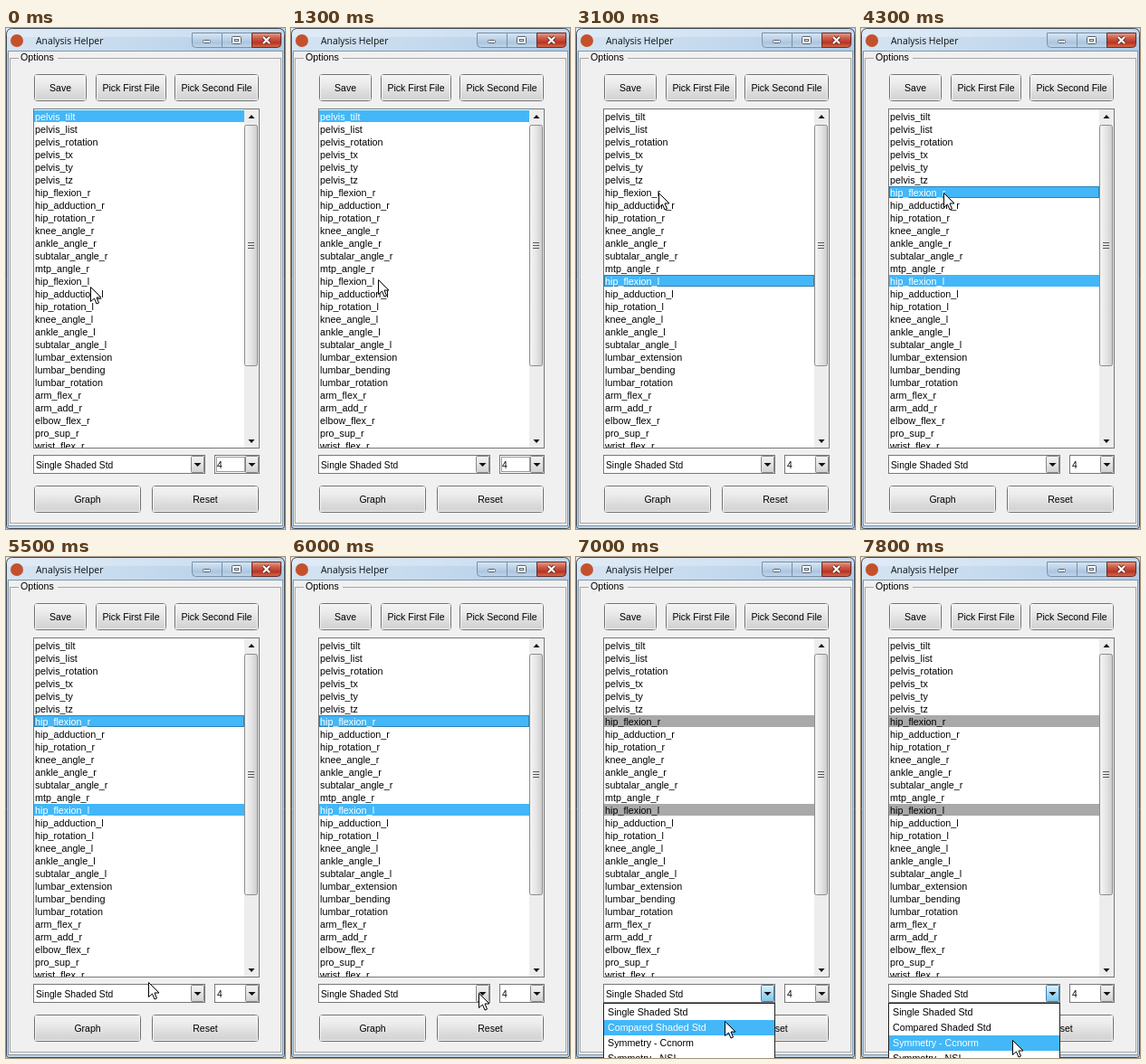
Animation, 308 px wide and 554 px high, one loop 8 s. Source, as an HTML page with a canvas:

```html
<!DOCTYPE html>
<html lang="en">
<head>
<meta charset="utf-8">
<title>Analysis Helper</title>
<style>
html, body { margin: 0; width: 100%; height: 100%; overflow: hidden; }
canvas { display: block; width: 308px; height: 554px; }
</style>
</head>
<body>
<canvas id="stage" width="308" height="554"></canvas>
<script>
const ctx = document.getElementById('stage').getContext('2d');
const LOOP = 8000, CLICK_LEFT = 1500, CLICK_RIGHT = 3700, OPEN = 6100;
const BLUE = '#43b7f8', GREY = '#a9a9a9', FACE = '#f0f0f0';

const sides = s => ['hip_flexion', 'hip_adduction', 'hip_rotation', 'knee_angle',
  'ankle_angle', 'subtalar_angle'].map(n => n + s);
const rows = [
  ...['tilt', 'list', 'rotation', 'tx', 'ty', 'tz'].map(n => 'pelvis_' + n),
  ...sides('_r'), 'mtp_angle_r', ...sides('_l'),
  ...['extension', 'bending', 'rotation'].map(n => 'lumbar_' + n),
  ...['arm_flex', 'arm_add', 'elbow_flex', 'pro_sup', 'wrist_flex'].map(n => n + '_r')
];
const plots = ['Single Shaded Std', 'Compared Shaded Std', 'Symmetry - Ccnorm', 'Symmetry - NSI'];

// Pointer path: time, x, y
const path = [
  [0, 93, 286], [100, 93, 286], [700, 95, 281], [1300, 96, 278], [1800, 96, 278],
  [2100, 98, 254], [2600, 92, 186], [3100, 91, 182], [4400, 91, 182], [5000, 136, 405],
  [5500, 157, 470], [5900, 207, 482], [6200, 207, 483], [6700, 163, 509],
  [6900, 163, 509], [7600, 167, 534], [8000, 167, 534]
];

function pointer(t) {
  const i = path.findIndex(p => p[0] > t);
  const [t0, x0, y0] = path[i - 1], [t1, x1, y1] = path[i];
  const k = (t - t0) / (t1 - t0);
  return [Math.round(x0 + (x1 - x0) * k), Math.round(y0 + (y1 - y0) * k)];
}

function fill(x, y, w, h, color) {
  ctx.fillStyle = color;
  ctx.fillRect(x, y, w, h);
}

function frame(x, y, w, h, color, dash = []) {
  ctx.strokeStyle = color;
  ctx.lineWidth = 1;
  ctx.setLineDash(dash);
  ctx.strokeRect(x + .5, y + .5, w - 1, h - 1);
  ctx.setLineDash([]);
}

function box(x, y, w, h, color, radius, edge) {
  ctx.beginPath();
  ctx.roundRect(x + .5, y + .5, w - 1, h - 1, radius);
  ctx.fillStyle = color;
  ctx.fill();
  ctx.strokeStyle = edge;
  ctx.lineWidth = 1;
  ctx.stroke();
}

function shade(x0, y0, x1, y1, ...colors) {
  const g = ctx.createLinearGradient(x0, y0, x1, y1);
  colors.forEach((c, i) => g.addColorStop(i / (colors.length - 1), c));
  return g;
}

// y is the vertical middle of the capitals
function text(s, x, y, size = 10.8, color = '#000', align = 'left', face = '"Liberation Sans", Arial') {
  ctx.font = `${size}px ${face}, sans-serif`;
  ctx.textAlign = align;
  ctx.fillStyle = color;
  ctx.fillText(s, x, y + 4);
}

function poly(points, color, edge) {
  ctx.beginPath();
  points.forEach(([x, y]) => ctx.lineTo(x, y));
  ctx.closePath();
  ctx.fillStyle = color;
  ctx.fill();
  if (edge) {
    ctx.strokeStyle = edge;
    ctx.lineWidth = 1;
    ctx.stroke();
  }
}

const arrow = (x, y, w, h) => poly([[x - w, y - h / 2], [x + w, y - h / 2], [x, y + h / 2]], '#111');

function button(label, x, y, w) {
  box(x, y, w, 30, shade(0, y, 0, y + 30, '#f4f4f4', '#ececec', '#dcdcdc', '#d0d0d0'), 3, '#707070');
  frame(x + 1, y + 1, w - 2, 28, 'rgba(255,255,255,.7)');
  text(label, x + w / 2, y + 15, 10.5, '#000', 'center');
}

function combo(label, x, w, hot) {
  fill(x, 472, w, 21, '#fff');
  frame(x, 472, w, 21, '#777');
  const bx = x + w - 16;
  const colors = hot ? ['#e4f5fd', '#a9dbf5', '#7cc4ea'] : ['#f4f4f4', '#e4e4e4', '#cfcfcf'];
  box(bx, 473, 15, 19, shade(0, 473, 0, 492, ...colors), 1, hot ? '#3c7fb1' : '#888');
  arrow(bx + 7.5, 483, 4, 4);
  text(label, x + 3, 483, 10.3);
}

function titleBar() {
  fill(0, 0, 308, 554, '#bdd5ec');
  fill(0, 0, 308, 27, shade(0, 0, 308, 0, '#d5e4f2', '#c4d9ee', '#afcbe6'));
  fill(0, 1, 308, 9, 'rgba(255,255,255,.25)');
  box(0, 0, 308, 554, 'transparent', [6, 6, 3, 3], '#3c4650');
  ctx.beginPath();
  ctx.arc(12, 14, 7, 0, 7);
  ctx.fillStyle = '#c4512c';
  ctx.fill();
  text('Analysis Helper', 33, 14, 10.4, '#111', 'left', '"Open Sans"');

  const glass = shade(0, 5, 0, 22, '#dbe8f4', '#c3d7ea', '#abc5df', '#c5dbee');
  box(205, 5, 34, 17, glass, [0, 0, 0, 4], '#7890a8');
  box(238, 5, 34, 17, glass, 0, '#7890a8');
  box(271, 5, 33, 17, shade(0, 5, 0, 22, '#e5a797', '#cf604b', '#b93322', '#d77555'), [0, 0, 4, 0], '#642b28');
  box(217, 13, 9, 4, '#fff', 1, '#56616d');
  box(249, 9, 11, 9, '#fff', 1, '#56616d');
  frame(252, 12, 5, 3, '#56616d');
  for (const [color, width] of [['#682a26', 4], ['#fff', 2.2]]) {
    ctx.strokeStyle = color;
    ctx.lineWidth = width;
    ctx.beginPath();
    ctx.moveTo(284, 10); ctx.lineTo(291, 17);
    ctx.moveTo(291, 10); ctx.lineTo(284, 17);
    ctx.stroke();
  }
}

function panel() {
  fill(3, 26, 302, 524, FACE);
  frame(2, 25, 304, 526, '#8396a8');
  frame(4, 33, 300, 515, '#a6a6a6');
  fill(14, 30, 43, 6, FACE);
  text('Options', 16, 32, 10.7);
  button('Save', 31, 51, 58);
  button('Pick First File', 99, 51, 78);
  button('Pick Second File', 186, 51, 93);
  button('Graph', 31, 506, 118);
  button('Reset', 161, 506, 118);
}

function list(t) {
  fill(30, 89, 250, 376, '#fff');
  const chosen = t < CLICK_LEFT ? [0] : t < CLICK_RIGHT ? [13] : [6, 13];
  const open = t >= OPEN;
  ctx.save();
  ctx.beginPath();
  ctx.rect(31, 90, 232, 374);
  ctx.clip();
  rows.forEach((name, i) => {
    const y = 91 + 14 * i, on = chosen.includes(i);
    if (on) fill(31, y, 232, 13, open ? GREY : BLUE);
    if (on && i === chosen[0] && t >= CLICK_LEFT && !open) frame(31, y, 232, 13, '#174b6c', [1, 1]);
    text(name, 32, y + 7, 10.8, on && !open ? '#fff' : '#000');
  });
  ctx.restore();

  fill(263, 90, 16, 374, '#ededed');
  box(263, 107, 15, 267, shade(263, 0, 278, 0, '#f6f6f6', '#e6e6e6', '#cacaca'), 2, '#8c8c8c');
  for (let y = 237; y < 245; y += 3) fill(267, y, 7, 1, '#555');
  arrow(271, 98, 3.5, -4);
  arrow(271, 457, 3.5, 4);
  frame(30, 89, 250, 376, '#777');
}

function popup(y) {
  const hot = Math.max(0, Math.floor((y - 495) / 17));
  fill(30, 493, 190, 61, '#fff');
  plots.forEach((name, i) => {
    if (i === hot) fill(31, 495 + 17 * i, 188, 17, BLUE);
    text(name, 35, 503 + 17 * i, 10.7, i === hot ? '#fff' : '#000');
  });
  frame(30, 493, 190, 70, '#222');
}

function cursor(x, y) {
  const shape = [[0, 0], [0, 16], [4, 12.5], [6.5, 18.5], [9, 17.5], [6.5, 11.5], [11.5, 11.5]];
  poly(shape.map(([a, b]) => [x + a + .5, y + b + .5]), '#fff', '#000');
}

function draw(now) {
  const t = Math.floor(now % LOOP / 100) * 100;
  const [x, y] = pointer(t), open = t >= OPEN;
  ctx.clearRect(0, 0, 308, 554);
  titleBar();
  panel();
  list(t);
  combo(plots[0], 30, 190, open);
  combo('4', 230, 50, false);
  if (t < CLICK_LEFT) frame(232, 474, 32, 17, '#333', [1, 1]);
  if (open) popup(y);
  cursor(x, y);
}

const start = performance.now();
function tick() {
  draw(performance.now() - start);
  requestAnimationFrame(tick);
}
tick();
</script>
</body>
</html>
```
